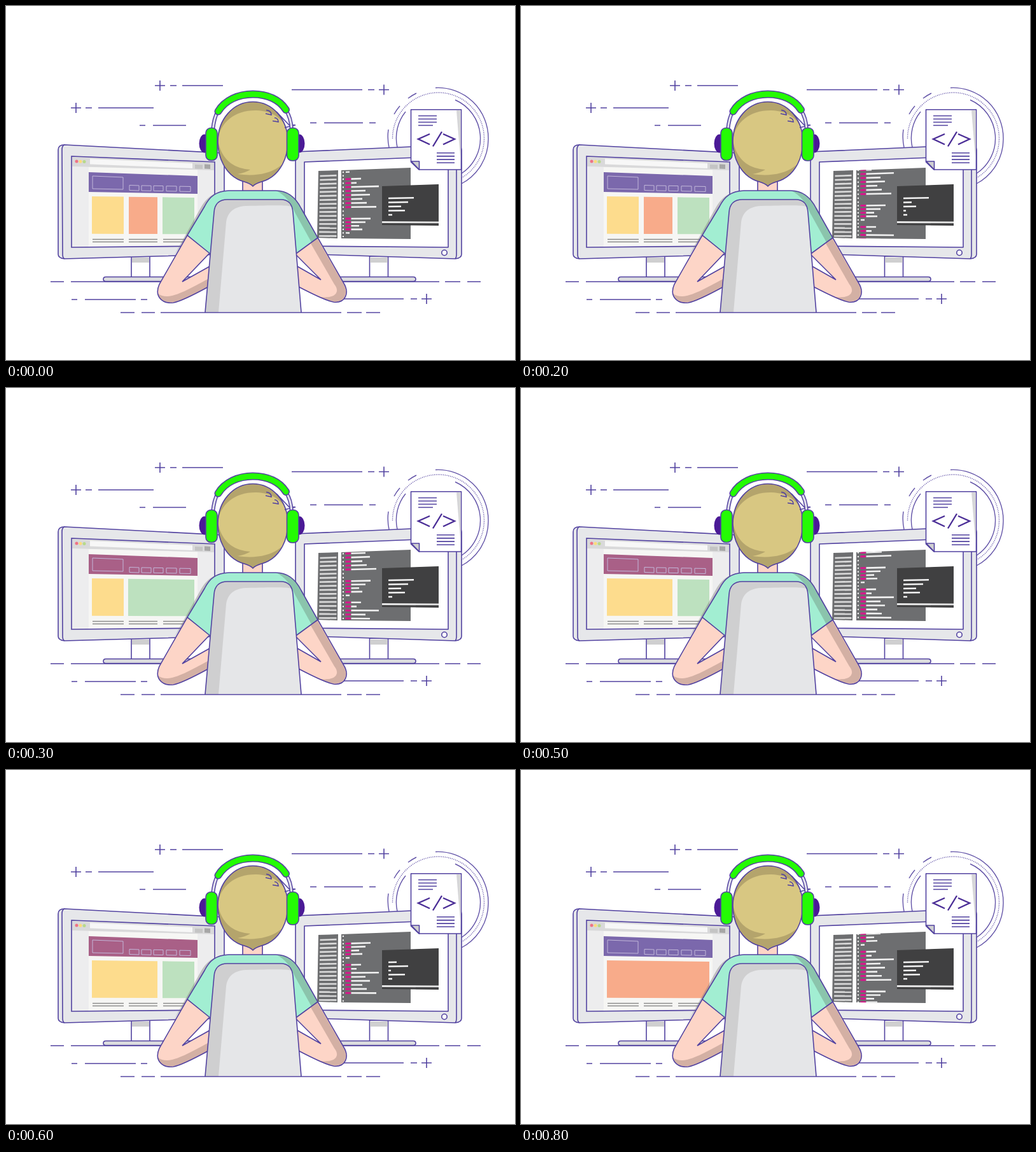
Animation of 800 by 556 pixels, one loop 0.9 s. Source, as an HTML page:

```html
<!DOCTYPE html>
<html lang="en">
<head>
<meta charset="utf-8">
<title>Developer at work</title>
<style>
  html, body { margin: 0; width: 100%; height: 100%; overflow: hidden; background: #fff; }
  svg { display: block; width: 100%; height: 100%; }
  .ink { stroke: #5242a0; stroke-width: 1.6; stroke-linejoin: round; }
  .line { fill: none; stroke: #5242a0; stroke-width: 1.6; }
  .thin { fill: none; stroke: #6354a8; stroke-width: 1.4; }
  .shade { fill: #cfcfd0; }
  .metal { fill: #e6e7ea; }
  .skin { fill: #fdd5c7; }
  .skin-shade { fill: #d3b0a4; }
  .cup { fill: #24fb04; }
  .band { fill: none; stroke-linecap: round; }
</style>
</head>
<body>
<svg viewBox="0 0 800 556">
  <defs>
    <clipPath id="panel"><path d="M527 258L636 254V366L527 365Z"/></clipPath>
    <path id="skull" d="M388 283C381 276 373 277 364 272C345 262 333 239 333 213C333 178 357 150.500 388 150.500C419 150.500 443 178 443 213C443 239 431 262 412 272C403 277 395 276 388 283Z"/>
    <clipPath id="head"><use href="#skull"/></clipPath>
    <path id="arc" d="M333.500 165.500C344 148 365 138.500 388 138.500C411 138.500 430 147 440 163"/>
    <path id="wires" d="M333 165Q327 175 325 195M440 164Q448 175 449 195"/>
  </defs>

  <!-- Loose strokes and desk -->
  <path class="line" d="M234 125h16m-8-8v16M258 125h10m9 0h64M102 160h16m-8-8v16M125 160h10m10 0h87M210 187.500h9m12 0h52M449 131.500h111m9 0h10M586 131.500h16m-8-8v16M478 183.500h10m12 0h61m10 0h10"/>
  <path class="line" d="M70 433h21m11 0h180M500 433h181m9 0h24m11 0h21M103 461h9m12 0h80m8 0h10M530 460h95m11 0h10M653 460h16m-8-8v16"/>

  <!-- Rings behind the document -->
  <path class="thin" d="M675 128.500A79 79 0 0 1 758 208A79 79 0 0 1 716 279M645 137A79 79 0 0 0 632 145M619 157A79 79 0 0 0 610 170M601 194A79 79 0 0 0 602 222"/>
  <path class="thin" stroke-dasharray="1.2 1.6" d="M607.500 208A72 72 0 0 1 751.500 208A72 72 0 0 1 716 270"/>
  <path class="thin" d="M628 166A66 66 0 0 0 615 222M706 147.500A66 66 0 0 1 716 263"/>

  <!-- Left monitor -->
  <path class="ink" fill="#fff" d="M197 393H226V427H197Z"/>
  <path class="shade" d="M198 395H225V403H198Z"/>
  <path class="ink" fill="#dcdddf" d="M300 425.500H157Q153 425.500 153 429Q153 432.500 157 432.500H300Z"/>
  <path class="ink metal" d="M92 218L343 231V390L92 397Q82 396 82 390V226Q82 218 92 218Z"/>
  <path class="line" d="M92 218Q88 219 88 226L89 390Q89 396 92 397"/>
  <path fill="#ededee" d="M103 236L328 245V377L103 379Z"/>
  <path fill="#f6f6f4" d="M130 253L301 257V377L130 378Z"/>
  <path fill="#d9d9da" d="M104 237L327 246V258L104 252Z"/>
  <path fill="#f7f7f7" d="M132 240L293 247V255L132 248.500Z"/>
  <path fill="#c4c4c4" d="M297 249L309 249.500V256L297 255.500Z"/>
  <path fill="#a6a6a6" d="M312 248.500L321 249V256L312 255.500Z"/>
  <circle cx="111" cy="244" r="2.500" fill="#ef7386"/>
  <circle cx="117" cy="244.300" r="2.500" fill="#fbdc7c"/>
  <circle cx="123" cy="244.600" r="2.500" fill="#b7d98a"/>
  <path id="banner" d="M130 261L301 267V295L130 292Z"/>
  <path fill="none" stroke="#c3b8da" d="M136 267L184 269V288L136 287ZM194 281.500L209 282V290L194 289.500ZM213 282L228 282.300V290.300L213 290ZM232 282.300L247 282.600V290.600L232 290.300ZM252 282.800L268 283V291L252 290.700ZM273 283.200L290 283.500V291.500L273 291.200Z"/>
  <g id="cards"></g>
  <path fill="none" stroke="#8b8b8b" stroke-width="1.500" d="M136 366.500H185M193 366.500H238M247 366.500H283M136 370.500H185M193 370.500H238M247 370.500H283"/>
  <path class="line" d="M103 236L328 245V377L103 379Z"/>

  <!-- Right monitor -->
  <path class="ink" fill="#fff" d="M571.500 393H600.500V427H571.500Z"/>
  <path class="shade" d="M572 395H600V403H572Z"/>
  <path class="ink" fill="#dcdddf" d="M500 425.500H640Q644 425.500 644 429Q644 432.500 640 432.500H500Z"/>
  <path class="ink metal" d="M455 229L706 218Q716 218 716 226V390Q716 396 706 397L455 389Z"/>
  <path class="line" d="M706 218Q708 220 708 226V390Q708 395 706 397"/>
  <path class="ink" fill="#fff" d="M469 245L695 236V379L469 377Z"/>
  <circle class="ink" fill="#fff" cx="689" cy="387.500" r="4.200"/>
  <path fill="#6d6e70" d="M491 259L522 258L521 365L489 364ZM527 258L636 254V366L527 365Z"/>
  <g id="sidebar"></g>
  <g id="code" clip-path="url(#panel)"></g>
  <path fill="#404041" d="M591 283L680 280V345L591 344Z"/>
  <path fill="#e4e4e4" d="M591 338L680 338.500V341.300L591 341Z"/>
  <g id="terminal"></g>

  <!-- Document -->
  <path class="ink" fill="#fff" d="M636.500 162.700H715.500V257H649L636.500 245Z"/>
  <path fill="#d6d6d8" d="M708 164H714.700V246Z"/>
  <path class="ink shade" d="M637 244H649.500V257Z"/>
  <path class="line" d="M648 172.500h29m-29 5h29m-29 5h29m-29 5h23M677 230.700h28m-28 5.200h28m-28 5.200h28m-28 5.200h28"/>
  <path fill="none" stroke="#4c2f97" stroke-width="2.400" d="M666 201L648 209L666 217.500M685 197.500L671 220.500M687 201L705 209L687 217.500"/>

  <!-- Body -->
  <path fill="#777" fill-opacity=".4" d="M350 290C327 291 316 300 306 317L264 392L285 360L317 310Z"/>
  <path class="ink skin" d="M372 268H403V295H372Z"/>
  <path class="skin-shade" d="M373 272H402L388 284Z"/>
  <path class="skin" d="M285 360L241 437C233 455 244 468 263 466Q276 464 320 440V409L277 433L320 388Z"/>
  <path class="skin-shade" d="M239 452C255 463 278 450 317 429V442Q276 464 263 465C249 466 240 461 239 452Z"/>
  <path class="line" d="M320 440Q276 464 263 466C244 468 233 455 241 437L285 360L320 388L277 433L320 409"/>
  <path class="skin" d="M490 364L530 434C541 451 533 467 515 465Q502 463 458 440V409L495 430L453 388Z"/>
  <path class="skin-shade" d="M489 365L529 434C540 451 532 466 515 464Q506 463 488 456C518 462 526 449 516 437L479 373Z"/>
  <path class="line" d="M458 440Q502 463 515 465C533 467 541 451 530 434L490 364L453 388L495 430L458 409"/>
  <path fill="#a2eed2" d="M350 290H424C444 290 456 302 464 318L490 364L453 391H322L285 360L312 315C320 299 330 291 350 290Z"/>
  <path fill="#8bc4ac" d="M424 290C444 290 456 302 464 318L490 364L480 371L455 326C447 309 440 297 424 290Z"/>
  <path class="line" d="M350 290H424C444 290 456 302 464 318L490 364L453 391M322 390L285 360L312 315C320 299 330 291 350 290"/>

  <!-- Chair -->
  <path fill="#e5e6e8" d="M313 481L327 324C328 310 335 304 348 304H432C444 304 450 312 451 324L464 481Z"/>
  <path class="shade" d="M313 481L327 324C328 310 335 304 348 304H432C440 304 447 309 449 315C440 313 430 313 377 314C357 315 348 325 346 340L334 481Z"/>
  <path class="line" d="M313 481L327 324C328 310 335 304 348 304H432C444 304 450 312 451 324L464 481M180 481.500h22m11 0h21m9 0h284m9 0h23m7 0h22"/>

  <!-- Head and headphones -->
  <g clip-path="url(#head)">
    <path fill="#b4a46c" d="M325 145H450V290H325Z"/>
    <path fill="#d8c782" d="M333 212C336 181 362 163 394 164C420 165 437 178 443 198V236C434 256 406 270 364 264Q376 262 384 257C356 255 339 240 333 212Z"/>
  </g>
  <use href="#skull" class="line"/>
  <path class="line" d="M409 163.500C414 164 417 167 417 171L408 169M422 175.500C426 176 428 179 428 182L419 180.500M425 166L445 187H455L438 191"/>
  <ellipse cx="312" cy="216" rx="8.500" ry="14.500" fill="#4b1a96"/>
  <ellipse cx="461" cy="216" rx="8.500" ry="14.500" fill="#4b1a96"/>
  <g class="band">
    <use href="#wires" stroke="#5242a0" stroke-width="6"/>
    <use href="#wires" stroke="#e3e1ed" stroke-width="3"/>
    <use href="#arc" stroke="#5242a0" stroke-width="12"/>
    <use href="#arc" stroke="#24fb04" stroke-width="8.800"/>
  </g>
  <rect class="ink cup" x="314" y="191.500" width="18" height="51" rx="8"/>
  <rect class="ink cup" x="441.500" y="191.500" width="18.500" height="51.500" rx="8"/>
</svg>
<script>
const LOOP = 900, STEP = 100;
const BLOCK = 95.4, SCROLL = 10.2;
const YELLOW = '#fddc8d', ORANGE = '#f8ab8a', GREEN = '#bde1bf';
const PURPLE = '#7b68ac', MAUVE = '#a96087';
const byId = id => document.getElementById(id);

const LAYOUTS = [
  { banner: PURPLE, cards: [[135, 185, YELLOW], [193, 238, ORANGE], [246, 296, GREEN]] },
  { banner: MAUVE, cards: [[135, 185, YELLOW], [192, 296, GREEN]] },
  { banner: MAUVE, cards: [[135, 238, YELLOW], [246, 296, GREEN]] },
  { banner: PURPLE, cards: [[135, 296, ORANGE]] }
];
const LAYOUT_AT = [0, 0, 0, 1, 1, 2, 2, 3, 3];

const PROMPTS = [
  [641, 632, 621, 627, 607],
  [641, 614, 621, 605, 607],
  [614, 632, 605, 627, 607]
];
const PROMPT_AT = [0, 1, 1, 0, 0, 0, 2, 2, 0];

// Right ends of the code rows; 0 is an empty row
const ROWS = [
  ...[558, 551, 586, 565, 572, 560, 567, 582, 0, 0].map((end, i) => [272 + i * 6.28, end]),
  ...[573, 565, 555, 560, 540, 0].map((end, i) => [334 + i * 5.6, end])
];

// Rows fan out slightly because the screen is seen at an angle
function bar(x1, x2, y, color, width, origin = 530) {
  const slope = -0.037 + 0.047 * (y - 258) / 107;
  const at = x => (y + slope * (x - origin)).toFixed(2);
  return `<path d="M${x1} ${at(x1)}L${x2} ${at(x2)}" stroke="${color}" stroke-width="${width}"/>`;
}

function card([left, right, color]) {
  const top = x => 299 + (x - 135) * 0.012;
  const bottom = x => 357.7 + (x - 135) * 0.004;
  return `<path fill="${color}" d="M${left} ${top(left)}L${right} ${top(right)}V${bottom(right)}L${left} ${bottom(left)}Z"/>`;
}

function codeRow(y, end) {
  const marker = bar(528.8, 531, y, '#f1f1f1', 2.2);
  if (!end) return marker;
  if (end === 540) return marker + bar(534, end, y, '#f1f1f1', 2.4);
  return marker + bar(533.5, 542, y, '#d9148c', 3) + bar(542.5, end, y, '#f1f1f1', 2.6);
}

function codeAt(step) {
  let out = '';
  for (let block = -1; block < 2; block++) {
    for (const [rowY, end] of ROWS) {
      const y = rowY + block * BLOCK - step * SCROLL;
      if (y > 254 && y < 369) out += codeRow(y, end);
    }
  }
  return out;
}

function draw(step) {
  const layout = LAYOUTS[LAYOUT_AT[step]];
  byId('banner').setAttribute('fill', layout.banner);
  byId('cards').innerHTML = layout.cards.map(card).join('');
  byId('code').innerHTML = codeAt(step);
  byId('terminal').innerHTML = PROMPTS[PROMPT_AT[step]]
    .map((end, i) => bar(601, end, 302 + i * 6.5, '#f3f3f3', 2.6, 601)).join('');
}

byId('sidebar').innerHTML = Array.from({ length: 16 }, (_, i) =>
  bar(493.5 - i * 0.1, 519.5, 267 + i * 6.28, '#dcdcdc', 2.6, 494)).join('');

let shown = -1;
function tick() {
  const step = Math.floor(performance.now() % LOOP / STEP);
  if (step !== shown) draw(shown = step);
  requestAnimationFrame(tick);
}
tick();
</script>
</body>
</html>
```
